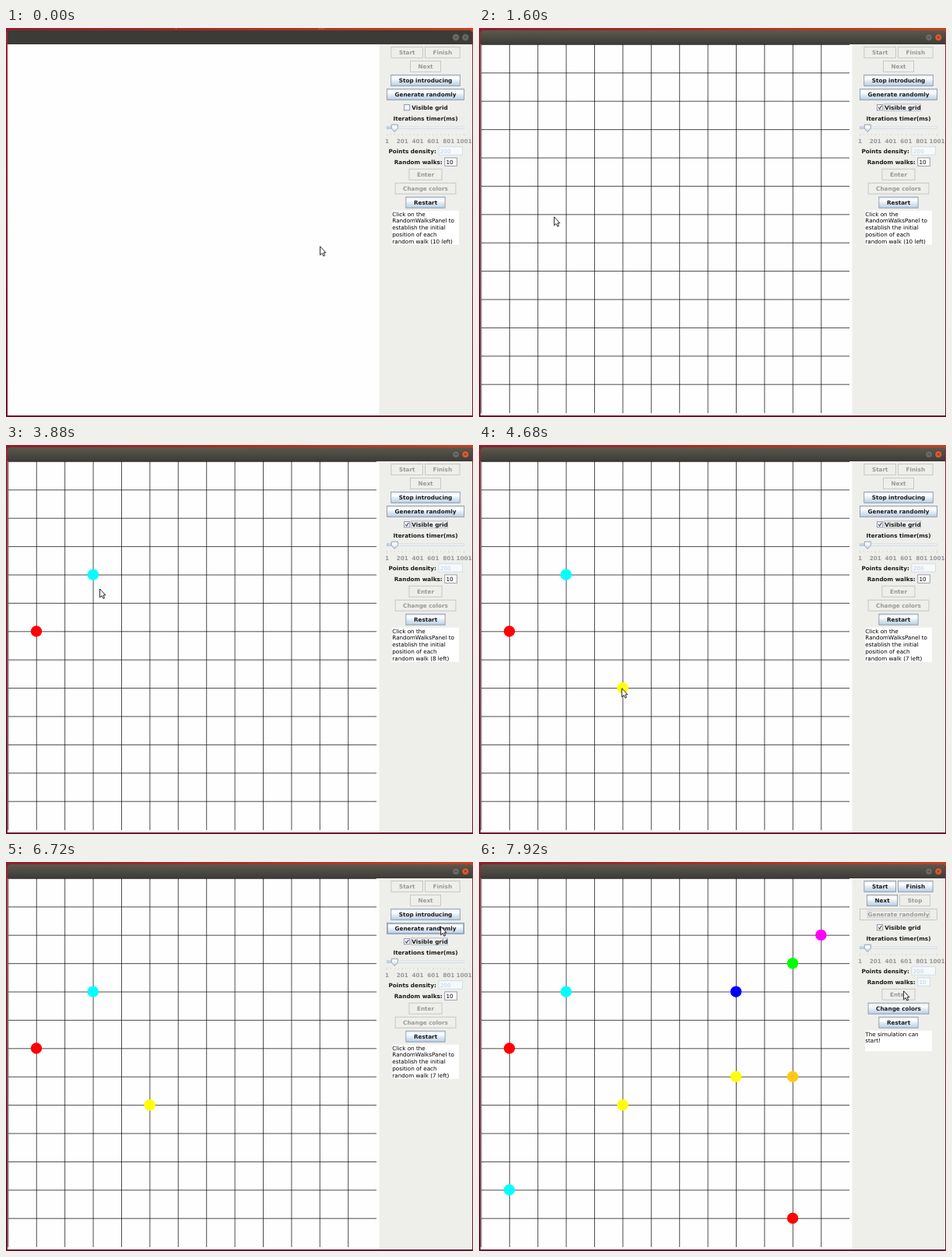
An HTML page that plays this animation: 600x500 px, repeating every 8 s.

```html
<!DOCTYPE html>
<html lang="en">
<head>
<meta charset="utf-8">
<title>Random walks</title>
<style>
  html, body { margin: 0; width: 100%; height: 100%; overflow: hidden; background: #701530; }
  svg { display: block; width: 600px; height: 500px; }
  text { font: 7.2px "DejaVu Sans", sans-serif; fill: #000; text-rendering: geometricPrecision; white-space: pre; }
  .b { font-size: 7.25px; font-weight: bold; fill: #1c1c1c; }
  .mid { text-anchor: middle; }
  .off { fill: #999; }
  .pale { fill: #b8cfe5; }
</style>
</head>
<body>
<svg viewBox="0 0 600 500" xmlns="http://www.w3.org/2000/svg">
  <defs>
    <linearGradient id="desk" x2="1" y2="0">
      <stop offset="0" stop-color="#8f1f2c"/><stop offset=".5" stop-color="#b02c22"/><stop offset="1" stop-color="#c8401e"/>
    </linearGradient>
    <linearGradient id="side" x2="0" y2="1">
      <stop offset="0" stop-color="#9b2430"/><stop offset="1" stop-color="#6d1234"/>
    </linearGradient>
    <linearGradient id="bar" x2="0" y2="1">
      <stop offset="0" stop-color="#5b594f"/><stop offset="1" stop-color="#3c3b37"/>
    </linearGradient>
    <linearGradient id="btn" x2="0" y2="1">
      <stop offset="0" stop-color="#dde8f3"/><stop offset=".3" stop-color="#fff"/>
      <stop offset=".6" stop-color="#dde8f3"/><stop offset="1" stop-color="#b8cfe5"/>
    </linearGradient>
  </defs>
  <rect width="600" height="500" fill="url(#side)"/>
  <rect width="600" height="5" fill="url(#desk)"/>
  <path id="marks" d="M402 1h8M218 1h2" stroke="#d98a70" stroke-dasharray="1 1"/>
  <path d="M2 21V7q0-4 4-4H595q4 0 4 4V21Z" fill="#3c3b37"/>
  <path id="title" d="M2 21V7q0-4 4-4H595q4 0 4 4V21Z" fill="url(#bar)"/>
  <g stroke="#3c3b37" stroke-width=".6">
    <circle cx="578" cy="12" r="4.5" fill="#6b6962"/>
    <circle cx="590.3" cy="12" r="4.5" fill="#6b6962"/>
    <circle id="close" cx="590.3" cy="12" r="4.5" fill="#e2582f"/>
    <path d="M576.3 12h3.4M588.8 10.5l3 3m0-3l-3 3" stroke-width=".8"/>
  </g>
  <rect x="2" y="21" width="478" height="477" fill="#fefefe"/>
  <rect x="479.5" y="21" width="119.5" height="477" fill="#eeeeeb"/>
  <path id="grid" fill="none" stroke="#000" stroke-width=".7"/>
  <g id="dots"></g>
  <g id="panel"></g>
  <path id="cursor" d="M0 0V11L2.6 8.7L4.3 12.4L6 11.6L4.4 8H7.4Z" fill="#fff" stroke="#111" stroke-width=".9"/>
</svg>
<script>
const LOOP = 8000, STEP = 40, CELL = 36.4, MID = 539;
const PRESS = 680, GRID_ON = 1000, GENERATE = 6920;
const COLORS = ["red", "cyan", "yellow", "blue", "lime", "magenta", "#ffc814"];
const CLICKS = [2680, 3720, 4680];
const NODES = [[1, 6], [3, 4], [5, 8], [9, 4], [11, 3], [12, 2], [11, 7], [11, 12], [1, 11], [9, 7]];
const HOME = [404, 281];

// pointer moves: start, end, x, y
const MOVES = [
  [80, 520, 522, 103], [680, 720, 516, 103], [1280, 1600, 97, 243], [1640, 1720, 48, 252],
  [1840, 2280, 39, 240], [2840, 3520, 112, 167], [3710, 4480, 184, 313], [4960, 5480, 527, 233],
  [5480, 6320, 554, 83], [6680, 6720, 559, 83], [7360, 7920, 546, 166]
];

const $ = id => document.getElementById(id);
const gx = i => 2.6 + CELL * i;
const gy = j => 21.1 + CELL * j;
const clamp = v => Math.min(1, Math.max(0, v));
const ease = u => u * u * (3 - 2 * u);
const shownAt = i => CLICKS[i] ?? GENERATE;

const pen = document.createElement("canvas").getContext("2d");
pen.font = 'bold 72.5px "DejaVu Sans", sans-serif';
const width = s => pen.measureText(s).width / 10;

function pointer(t) {
  return MOVES.reduce(([x, y], [from, to, nx, ny]) => {
    const k = ease(clamp((t - from) / (to - from)));
    return [x + (nx - x) * k, y + (ny - y) * k];
  }, HOME);
}

const inside = ([px, py], x, y, w, h) => px >= x && px <= x + w && py >= y && py <= y + h;
const label = (s, x, y, cls = "b") => `<text class="${cls}" x="${x}" y="${y + 2.65}">${s}</text>`;
const box = (x, y, w, h, fill, stroke, sw = .8) =>
  `<rect x="${x}" y="${y}" width="${w}" height="${h}" fill="${fill}" stroke="${stroke}" stroke-width="${sw}"/>`;

// one centred row of buttons: { text, on, pressed, focus }
function buttons(y, tip, ...items) {
  const sizes = items.map(b => width(b.text) + 20), h = 14, gap = 3;
  let x = MID - (sizes.reduce((a, b) => a + b) + gap * (items.length - 1)) / 2;
  return items.map(({ text, on, pressed, focus }, i) => {
    const w = sizes[i], left = x, top = y - h / 2;
    x += w + gap;
    const fill = !on ? "#eeeeeb" : pressed ? "#b8cfe5" : "url(#btn)";
    return box(left, top, w, h, fill, on ? "#7f8f9f" : "#bdbdbb") +
      (on && inside(tip, left, top, w, h) ? box(left + 1, top + 1, w - 2, h - 2, "none", "#8fa9c4") : "") +
      (focus ? box(left + 9.5, y - 4.4, w - 19, 8.8, "none", "#c3cbd2") : "") +
      label(text, left + w / 2, y, on ? "b mid" : "b mid off");
  }).join("");
}

function checkbox(y, s) {
  return box(511.5, y - 3.7, 7.2, 7.2, s.pressed ? "#8fa9c8" : "#f4f7fa", s.pressed ? "#4f6480" : "#7a8a99") +
    (s.hover && !s.pressed ? box(512.6, y - 2.6, 5, 5, "none", "#b8cfe5", 1.2) : "") +
    (s.checked ? `<path d="M513.3 ${y - .4}l1.3 2.4l2.6-4.4" fill="none" stroke="#222"/>` : "") +
    (s.focus ? box(520.5, y - 4.5, 47, 8.6, "none", "#a3b8cc") : "") +
    label("Visible grid", 521.3, y);
}

function slider(y) {
  const x = 489.5, len = 99;
  let out = box(x, y - 1.2, len, 2.4, "#f0f3f5", "#c3d1de", .6) +
    box(x, y - 1.2, 9, 2.4, "#c8daea", "#a3b8cc", .6) +
    `<path d="M495.3 ${y - 4}h8v5l-4 4.4l-4-4.4Z" fill="url(#btn)" stroke="#8796a5" stroke-width=".8"/>`;
  for (let i = 0; i <= 20; i++)
    out += `<path d="M${x + i * len / 20} ${y + 8}v${i % 4 ? 1.4 : 2.6}" stroke="#bfc3c5" stroke-width=".6"/>`;
  for (let i = 0; i <= 5; i++) out += label(i * 200 + 1, x + i * len / 5, y + 16.8, "b mid off");
  return out;
}

function field(name, value, w, y, on) {
  const tw = width(name), x = MID - (tw + 3 + w) / 2, fx = x + tw + 3;
  return label(name, x, y) +
    box(fx, y - 5.2, w, 10.4, on ? "#fff" : "#f7f9fa", on ? "#7a8a99" : "#c6d8e8") +
    label(value, fx + 1.8, y, on ? "" : "pale");
}

function panel(t, tip) {
  const done = t >= GENERATE;
  let y = 22.3;
  const row = h => (y += h) - h / 2;
  const put = (...items) => buttons(row(18), tip, ...items);
  const generate = { text: "Generate randomly", on: !done, pressed: t >= GENERATE - STEP, focus: done };

  let out = put({ text: "Start", on: done }, { text: "Finish", on: done });
  out += done
    ? put({ text: "Next", on: true }, { text: "Stop" })
    : put({ text: "Next" }) + put({ text: "Stop introducing", on: true });
  out += put(generate);

  const cy = row(16);
  out += checkbox(cy, {
    pressed: t >= PRESS && t < GRID_ON,
    checked: t >= GRID_ON,
    focus: t >= PRESS && !done,
    hover: inside(tip, 508, cy - 5, 60, 11)
  });
  out += label("Iterations timer(ms)", MID, row(12.5), "b mid") + slider(row(28) - 8.6) +
    field("Points density:", "200", 30.5, row(14.2), false) +
    field("Random walks:", "10", 15.5, row(14.2), !done) +
    put({ text: "Enter" }) + put({ text: "Change colors", on: done }) + put({ text: "Restart", on: true });

  const left = NODES.filter((_, i) => t < shownAt(i)).length;
  const lines = done ? ["The simulation can", "start!"] :
    ["Click on the", "RandomWalksPanel to", "establish the initial", "position of each", `random walk (${left} left)`];
  return out + `<rect x="496" y="${y + 1.5}" width="86" height="${done ? 26.5 : 44}" fill="#fff"/>` +
    lines.map((s, i) => label(s, 496.3, y + 5.7 + i * 8.9, "")).join("");
}

let d = "";
for (let i = 0; i < 13; i++) d += `M${gx(i) + .3} 21V495M3 ${gy(i) + .3}H476`;
$("grid").setAttribute("d", d);
$("dots").innerHTML = NODES.map(([i, j], n) =>
  `<circle cx="${gx(i)}" cy="${gy(j)}" r="7.2" fill="${COLORS[n % COLORS.length]}"/>`).join("");
const dots = [...$("dots").children];

function draw(t) {
  const tip = pointer(t), lit = clamp((t - PRESS + STEP) / 200);
  const show = (el, on) => el.setAttribute("visibility", on ? "visible" : "hidden");
  $("title").setAttribute("opacity", lit);
  $("close").setAttribute("opacity", lit);
  $("marks").setAttribute("opacity", 1 - lit);
  show($("grid"), t >= GRID_ON);
  dots.forEach((dot, i) => show(dot, t >= shownAt(i)));
  $("panel").innerHTML = panel(t, tip);
  $("cursor").setAttribute("transform", `translate(${tip[0] - .4} ${tip[1] - .2})`);
}

let last = -1;
function tick() {
  const t = Math.floor(performance.now() % LOOP / STEP) * STEP;
  if (t !== last) draw(last = t);
  requestAnimationFrame(tick);
}
tick();
</script>
</body>
</html>
```
